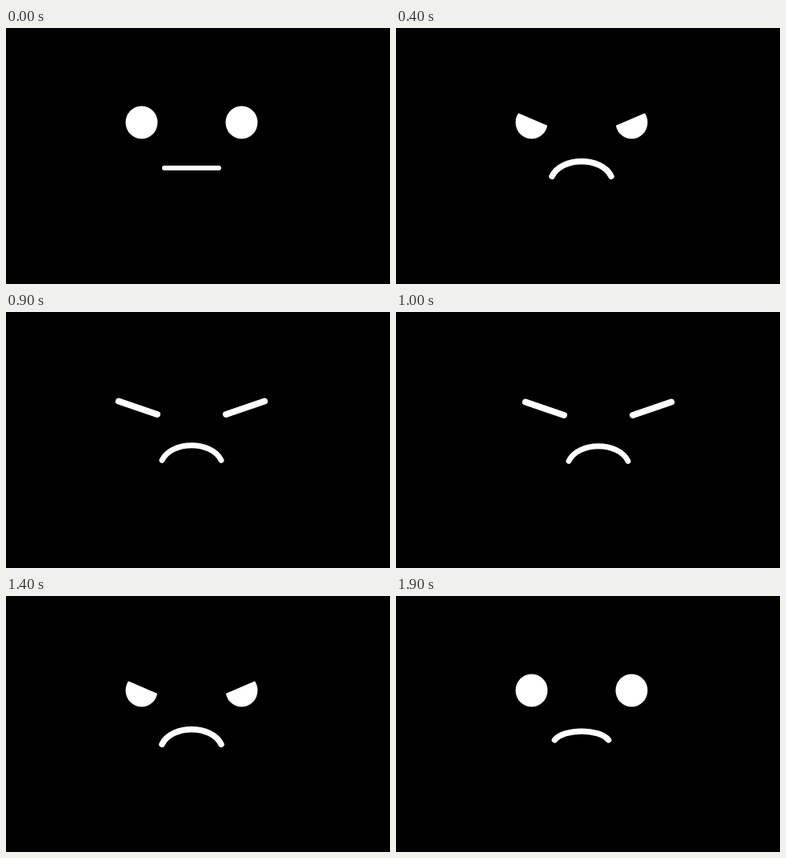
Write an HTML page with a canvas that moves like this. It is 480 px wide and 320 px high and loops after 2 s.

```html
<!DOCTYPE html>
<html lang="en">
<head>
<meta charset="utf-8">
<title>Angry face</title>
<style>
html, body { margin: 0; width: 100%; height: 100%; overflow: hidden; background: #000; }
canvas { display: block; width: 100vw; height: 100vh; }
</style>
</head>
<body>
<canvas id="stage" width="480" height="320"></canvas>
<script>
const ctx = document.getElementById('stage').getContext('2d');
const LOOP = 2000, STEP = 100, CENTER = 232;

// Half width, end height, control half width, control height, line width
const MOUTHS = {
  flat: [34, 175, 20, 175, 6],
  slight: [33.7, 180, 22, 165.4, 7.3],
  sad: [35.5, 183, 24, 162.4, 7.4],
  frown: [37, 185.3, 25, 160.6, 7.5],
  tense: [37, 185.3, 25, 160.6, 6.9]
};

// Draws a part on the right, then its reflection on the left
function mirrored(draw) {
  for (const side of [1, -1]) {
    ctx.save();
    ctx.scale(side, 1);
    draw();
    ctx.restore();
  }
}

function drawMouth([half, y, bend, top, width]) {
  ctx.lineWidth = width;
  ctx.beginPath();
  ctx.moveTo(-half, y);
  ctx.bezierCurveTo(-bend, top, bend, top, half, y);
  ctx.stroke();
}

// lid: height of the lid edge above the eye's centre; the edge slopes inward
function drawEye(lid) {
  const x = 62.5, y = 118, r = 25, slope = 0.43;
  ctx.beginPath();
  ctx.moveTo(x - r, y - lid + slope * r);
  ctx.lineTo(x + r, y - lid - slope * r);
  ctx.lineTo(x + r, y + r);
  ctx.lineTo(x - r, y + r);
  ctx.closePath();
  ctx.clip();
  ctx.beginPath();
  ctx.ellipse(x, y, 20, 20.6, 0, 0, Math.PI * 2);
  ctx.fill();
}

function drawSquint() {
  ctx.lineWidth = 8;
  ctx.beginPath();
  ctx.moveTo(43, 128);
  ctx.lineTo(91.2, 111.5);
  ctx.stroke();
}

function poseAt(step) {
  if (step >= 7 && step <= 13) {
    const swing = Math.round(Math.sin((step - 9) * Math.PI / 2));
    return { squint: true, mouth: 'tense', dx: swing * 20 + Math.abs(swing), dy: swing > 0 ? 1 : 0 };
  }
  const phase = Math.min(step, 20 - step, 4);
  const mouth = ['flat', 'slight', 'sad', 'frown', 'frown'][phase];
  return { lid: 44.4 - phase * 10, mouth, dx: 0, dy: 0 };
}

function render(time) {
  const pose = poseAt(Math.floor(time % LOOP / STEP));
  ctx.fillStyle = '#000';
  ctx.fillRect(0, 0, 480, 320);
  ctx.fillStyle = ctx.strokeStyle = '#fff';
  ctx.lineCap = 'round';
  ctx.save();
  ctx.translate(CENTER + pose.dx, pose.dy);
  mirrored(() => pose.squint ? drawSquint() : drawEye(pose.lid));
  drawMouth(MOUTHS[pose.mouth]);
  ctx.restore();
}

const start = performance.now();
function tick() {
  render(performance.now() - start);
  requestAnimationFrame(tick);
}
tick();
</script>
</body>
</html>
```
